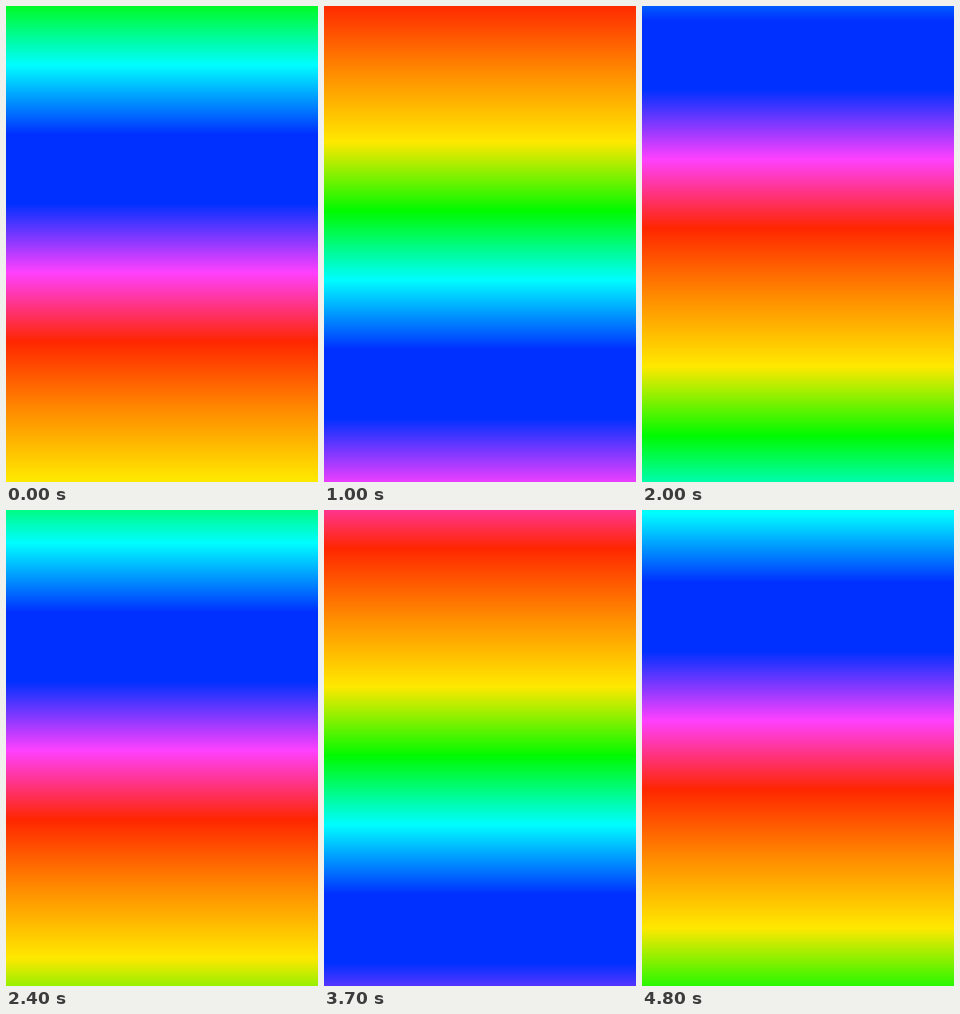
Animation, 312 px wide and 476 px high, one loop 4900 ms. Source, as an HTML page without scripts:

```html
<!DOCTYPE html>
<html lang="en">
<head>
<meta charset="utf-8">
<title>Rainbow scroll</title>
<style>
  html, body {
    margin: 0;
    width: 100%;
    height: 100%;
    overflow: hidden;
  }

  .rainbow {
    width: 100%;
    height: 100%;
    /* eight evenly spaced colours, the blue one twice */
    background: linear-gradient(
      #00fa00, #00fdff, #0030ff, #0030ff,
      #ff40ff, #ff2600, #ff8c00, #ffe800, #00fa00
    ) 0 -10px / 100% 553px repeat-y;
    animation: scroll 4.9s infinite;
  }

  /* one step every 100 ms, about 22px each, then a hard restart */
  @keyframes scroll {
    0%      { background-position-y: -10px;  animation-timing-function: steps(10); }
    20.408% { background-position-y: 205px;  animation-timing-function: steps(6); }
    32.653% { background-position-y: 342px;  animation-timing-function: steps(8); }
    48.979% { background-position-y: 517px;  animation-timing-function: steps(8); }
    65.306% { background-position-y: 687px;  animation-timing-function: steps(9); }
    83.673% { background-position-y: 888px;  animation-timing-function: steps(7); }
    97.959% { background-position-y: 1040px; animation-timing-function: steps(1); }
    100%    { background-position-y: 1062px; }
  }
</style>
</head>
<body>
<div class="rainbow"></div>
</body>
</html>
```
